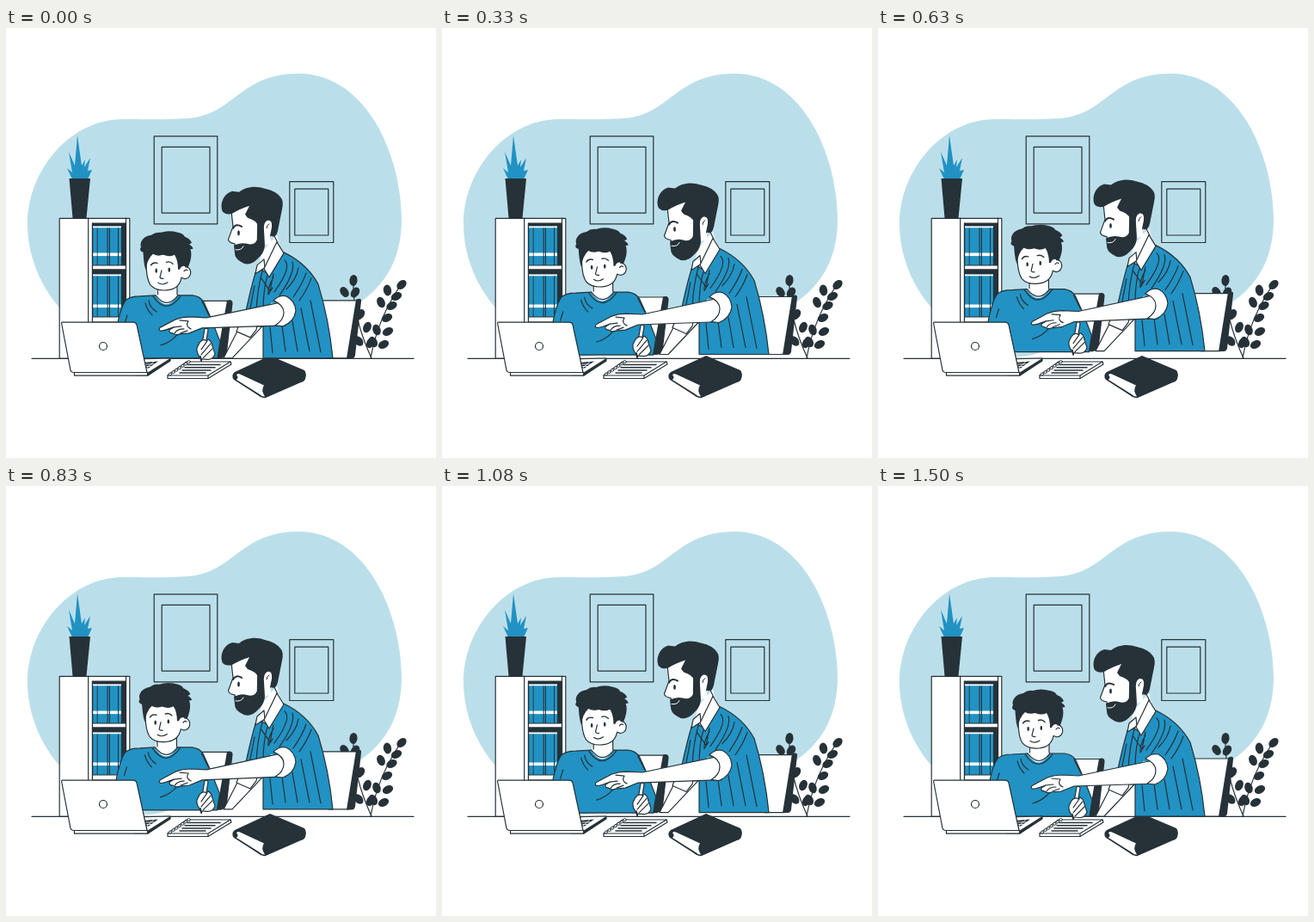
Recreate the animation shown at these times as an HTML page with a canvas. Size 500 px wide and 500 px high, loop 1540 ms.

```html
<!DOCTYPE html>
<html lang="en">
<head>
<meta charset="utf-8">
<title>Homework help</title>
<style>
html, body { margin: 0; width: 100%; height: 100%; overflow: hidden; background: #fff; }
canvas { display: block; width: 500px; height: 500px; }
</style>
</head>
<body>
<canvas id="stage" width="500" height="500"></canvas>
<script>
const ctx = document.getElementById('stage').getContext('2d');
const LOOP = 1540, PEAK = 705, LIFT = 8.6;
const DARK = '#263238', BLUE = '#2192c3', PALE = '#bbdfea', WHITE = '#fff';

function shape(d, fill, width = 1.2, color = DARK) {
  const path = new Path2D(d);
  if (fill) { ctx.fillStyle = fill; ctx.fill(path); }
  if (width) { ctx.lineWidth = width; ctx.strokeStyle = color; ctx.stroke(path); }
}
const line = (d, width, color) => shape(d, null, width, color);
const solid = (d, fill = DARK) => shape(d, fill, 0);

function box(x, y, w, h, fill, width = 1.2) {
  shape(`M${x} ${y}h${w}v${h}h${-w}Z`, fill, width);
}

function oval(x, y, rx, ry, fill = DARK, angle = 0, width = 0) {
  ctx.beginPath();
  ctx.ellipse(x, y, rx, ry, angle, 0, Math.PI * 2);
  ctx.fillStyle = fill;
  ctx.fill();
  if (width) { ctx.lineWidth = width; ctx.strokeStyle = DARK; ctx.stroke(); }
}

function moved(dx, dy, angle, px, py, draw) {
  ctx.save();
  ctx.translate(px + dx, py + dy);
  ctx.rotate(angle);
  ctx.translate(-px, -py);
  draw();
  ctx.restore();
}

function wall() {
  solid('M62 325C38 297 25 262 25 228C25 165 75 106 136 106C170 106 183 107 212 105C265 101 272 53 340 53C420 53 460 150 460 222C460 270 440 300 410 320C360 336 300 328 262 337C225 346 205 381 165 382C125 382 85 355 62 325Z', PALE);
  box(172.2, 125.8, 73.6, 102);
  box(181.2, 138.3, 55.8, 76.8);
  box(329.8, 178.7, 51, 70.8);
  box(335.8, 187.2, 39, 53.8);
}

function books(y, h, gap) {
  box(100.5, y, 39, h, DARK);
  for (const [x, w] of [[101.3, 4.4], [106.6, 11], [118.7, 1.2], [121, 9], [131, 3]]) {
    box(x, y + gap, w, h - gap, BLUE, 0);
    box(x, y + h - 14.5, w, 3.6, WHITE, 0);
  }
  box(101, y + gap, 33, 1.8, WHITE, 0);
}

function shelf() {
  box(62.2, 221.3, 81.6, 163, WHITE);
  line('M95.7 221V384M139.5 221V384M100.5 227V384');
  books(227, 49, 3.5);
  box(100.5, 276, 39, 5, WHITE);
  books(281, 55, 5.5);
  box(100.5, 336, 39, 6, WHITE);
  solid('M77 176L71 163L77 168L73 144L80 160L83 125L88 160L92 153L91 162L98 151L95 166L100 165L95 176Z', BLUE);
  solid('M73.5 175H98L93.5 221H77.5Z');
}

function plant() {
  line('M425 384C414 360 403 330 404 296M424 384C430 350 442 325 458 300');
  const leaves = [
    [404, 293.5, .1], [393.5, 307, -.6], [406, 307.5, .6], [412, 333, .6],
    [420, 348, .4], [410, 364, -.7], [424, 366, .5],
    [460, 298.5, .8], [443.5, 305, -.2], [454, 312, 1.1], [436, 319, -.4],
    [448.5, 323, 1.1], [443, 337, 1.1], [431, 351, -.3], [444, 353, 1.1],
    [427, 365, -.5], [439, 368, 1.1]
  ];
  for (const [x, y, angle] of leaves) oval(x, y, 4.6, 6.5, DARK, angle);
}

function book() {
  solid('M307 381L347 398Q350 402 348 408Q347 411 343 412L302 430Q297 431 293 427L265 409Q261 404 266 400Z');
  solid('M268 403.5Q269 401 272 402.5L300 415.5Q296 421 301 428.5Q298 429 295 426L268 409Q271 406 268 403.5Z', WHITE);
}

function notebook() {
  shape('M210 388H261L262 391L235 407.5H188V404Z', WHITE);
  line('M188 404H235L261 388M235 404V407');
  line('M211 391.5H249M208 394.8H243M205 398H238M202 401H232', 1.5);
  for (let i = 0; i < 7; i++) oval(191 + i * 3.6, 402.5 - i * 2.4, 1.7, 1.5, WHITE, 0, 1);
}

function laptop() {
  shape('M152 385L191 384V387L165 404H150Z', WHITE);
  solid('M164 401L191 384V387L165 404.5Z');
  solid('M160 389L177 387.5L166 395.5H161Z');
  line('M161 391H173M163 393.5H170M164 395L173 387', .8, WHITE);
  box(79.5, 400.5, 85, 3.7, WHITE);
  shape('M65 342.2H147Q151 342 152 345L164 400.5H78Q76 400.5 75 398L64.5 343Z', WHITE);
  oval(113, 370, 4.5, 4.5, WHITE, 0, 1.2);
}

function chairs() {
  shape('M226 317.5H260L250 384H220Z', WHITE);
  solid('M257 317Q264 315 263.5 321L257 377Q255 384 250 384.5H245Z');
  shape('M366 317H409L398 384H375Z', WHITE);
  solid('M407 316Q413.5 313 413 318L406 381Q405 384.5 402 384.5H396Z');
}

function boyBody() {
  shape('M127 358C130 340 134 324 139 317Q144 312 156 312L174 311H200L217 311Q226 312 230 319L239 339L249 365L246 384H127Z', BLUE);
  solid('M176 302H199V312Q187 331 174 312Z', WHITE);
  line('M176.5 302V310M199 298V310M174 311Q187 328 200 311M171 312Q186 335 203 312');
  line('M162 320Q164 328 170 334M166 317Q167 325 175 330M228 318L236 334M180 369Q191 366 199 357M138 344L141 334');
}

function boyHead() {
  oval(208.5, 284.8, 6.2, 7, WHITE, .2, 1.2);
  shape('M163 262C163 280 163 291 168 299Q174 306 187 305Q201 304 204 291L205 262Z', WHITE);
  solid('M200 277H208V290H203Z', WHITE);
  solid('M162.5 282C160 274 160 267 159.5 261Q154 259 157 255C155 249 160 242 169 241Q174 237 180 238Q189 235 200 238Q206 239 208 243Q214 245 216 250L213 252Q217 254 217.5 257L214.5 257.5C217 265 214 273 211.5 279Q205 274 202 281H200Q200 270 196 264Q190 267 183 264Q175 266 171 263Q164 269 162.5 282Z');
  oval(174.7, 282.3, 1.3, 2.6);
  oval(189.8, 281.3, 1.3, 2.6);
  line('M168.5 276Q171 272 176 273.5M186.5 272.5Q191 271 194 274.5', 1.4);
  line('M181 282L179 290Q180 292 183 291.5M177 296.5Q182 300 188 296M207 283Q209 280 211 282');
}

function boyHand() {
  shape('M231 350Q234 348 235 351L230 381L227 387.5L225.5 382Z', WHITE);
  shape('M225 366Q229 361 233 364L235 362Q239 364 240 370L243 379Q241 386 234 385.5L227 385Q221 378 222 372Z', WHITE);
  line('M227 374L234 364M227 380L238 367M229 384L240 373');
  line('M226 382L227 387', 1.8);
}

function manBody() {
  shape('M272 347L253 384H263L298 347Z', WHITE);
  shape('M271 345L292 346L291 351L284 360L268 353Z', WHITE);
  shape('M292 279C286 296 282 315 278 334L277 346H299V384H380C377 354 371 324 363 298Q350 274 323 261L307 287Z', BLUE);
  line('M299 279Q292 304 291 330M305 286Q298 302 299 347M289 300L284 326M296 290L307 306L311 286M311 290Q304 302 305 310L310 302');
  line('M324 270Q333 278 312 307M333 272Q337 284 318 311M340 279Q338 292 326 304M349 285Q345 297 334 313M355 291Q350 305 341 317');
  line('M307 348L310 378M321 346L325 376M333 341L339 376M343 326L353 376M354 317L366 377');
  solid('M298 260L315 241L319 256L302 279L294 276Z', WHITE);
  line('M312 242L316 250');
  shape('M300 269L292 276L290 286L301 279Z', WHITE);
  shape('M315 249L323 262L306 290L300 280Z', WHITE);
}

function manHead() {
  shape('M262 213L264 231L258.5 246Q259 250 266 251L270 264L292 266L293 215L290 202Z', WHITE);
  solid('M252 214C248 205 253 193 263 190L271 191C278 185 290 183 301 187Q315 190 320 198Q323 202 321 211L316 236Q314 245 308 242L301 251C301 260 297 265 290 271Q281 278 273 272Q266 268 266 262L265 253Q273 249 280 251Q290 254 293 244V230Q291 224 281 221L278 217L283 207Q271 211 263 216Q256 218 252 214Z');
  solid('M301 253L300 236Q299 226 304 224Q310 223 309 232L307 242L309 250Z', WHITE);
  line('M303 233Q303 229 306 228', 1);
  oval(270.5, 238.5, 1.4, 3);
  line('M264 233Q267 227 274 231', 2);
  line('M267 258Q274 259 276 254', 1, WHITE);
}

function pointingArm() {
  solid('M308 320H325L329 340L312 346Z', WHITE);
  shape('M325 318L233 337L214 336Q205 336 197 339L180 348Q177 350 179 352Q182 353 195 348L190 351Q189 355 194 355Q197 358 202 356L213 355L228 349L325 346', WHITE);
  line('M195 348L204 347M202 340L212 341Q208 347 215 350M196 355Q199 350 207 350M203 355L211 352');
  shape('M311 317Q318 310 326 312Q336 317 337 329Q335 342 322 347L313 346Q323 340 323 331Q323 322 311 317Z', WHITE);
}

function render(t) {
  const k = (1 + Math.cos((t - PEAK) * 2 * Math.PI / LOOP)) / 2;
  const dy = -LIFT * k;
  ctx.fillStyle = WHITE;
  ctx.fillRect(0, 0, 500, 500);
  ctx.lineJoin = ctx.lineCap = 'round';
  wall();
  shelf();
  plant();
  line('M30 384.3H474');
  book();
  notebook();
  moved(0, dy, 0, 0, 0, () => {
    chairs();
    manBody();
    manHead();
  });
  moved(-k * .6, dy + k, 0, 0, 0, boyBody);
  moved(-k * .6, dy + k * .6, -.02 * k, 187, 305, boyHead);
  moved(0, dy + k, 0, 0, 0, boyHand);
  moved(0, dy, -.01 * k, 325, 330, pointingArm);
  laptop();
}

const start = performance.now();
function tick() {
  render((performance.now() - start) % LOOP);
  requestAnimationFrame(tick);
}
tick();
</script>
</body>
</html>
```
